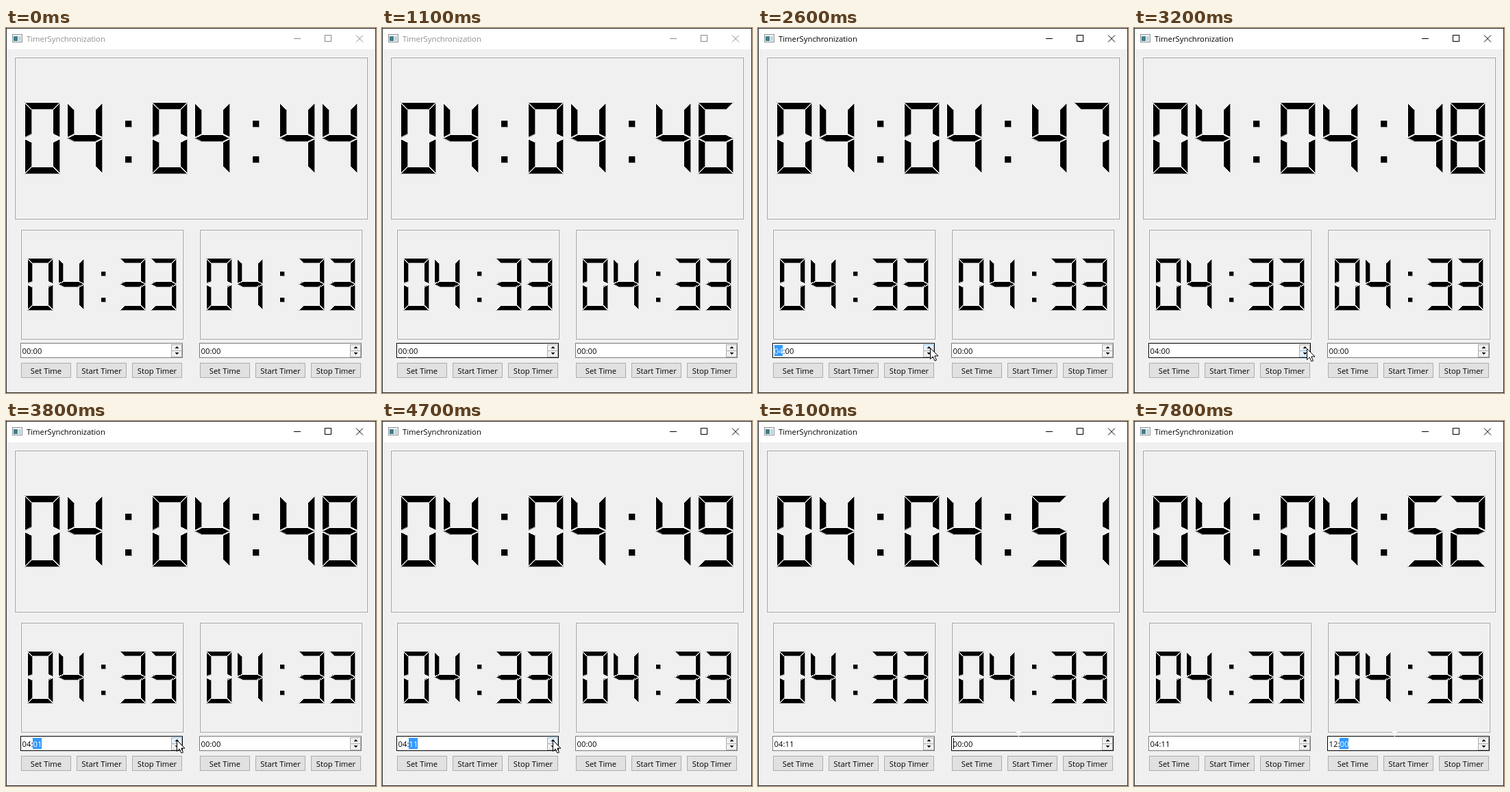
An HTML page that plays this animation: 540 px wide and 532 px high, repeating every 8 s.

```html
<!DOCTYPE html>
<html lang="en">
<head>
<meta charset="utf-8">
<title>TimerSynchronization</title>
<style>
  html, body { margin: 0; width: 100%; height: 100%; overflow: hidden; background: #f0f0f0; }
  svg { display: block; shape-rendering: crispEdges; }
  text { font: 11.3px "Open Sans", "Noto Sans", sans-serif; white-space: pre; }
</style>
</head>
<body>
<svg width="540" height="532" viewBox="0 0 540 532">
  <g id="fixed"></g>
  <g id="live"></g>
</svg>
<script>
const LOOP = 8000, STEP = 100;

// Each table lists [start time, ...state]; a state holds until the next one.
const TICKS = [200, 1100, 2200, 3100, 4100, 5100, 6100, 7100];
const LEFT = [
  [0, '00:00'], [2000, '01:00', 'h'], [2100, '02:00', 'h'], [2300, '03:00', 'h'],
  [2500, '04:00', 'h'], [2900, '04:00'], [3800, '04:01', 'm'], [4100, '04:04', 'm'],
  [4200, '04:06', 'm'], [4300, '04:09', 'm'], [4400, '04:11', 'm'], [5100, '04:11'],
];
const RIGHT = [
  [0, '00:00'], [5100, '00:00', 'caret', 0], [5600, '00:00'], [6100, '00:00', 'caret', 0],
  [6700, '00:00'], [7000, '00:00', 'caret', 6], [7500, '00:00', 'm'],
  [7700, '1:00', 'caret', 6], [7800, '12:00', 'm'],
];
const MOUSE = [
  [0, 20, -19, 'arrow'], [200, 20, -8, 'arrow'], [300, 20, 12, 'arrow'], [400, 21, 65, 'arrow'],
  [500, 22, 160, 'arrow'], [600, 25, 280, 'arrow'], [700, 28, 390, 'arrow'], [800, 31, 452, 'arrow'],
  [900, 34, 485, 'arrow'], [1000, 36, 474, 'beam'], [1800, 130, 471, 'beam'],
  [1900, 249, 467, 'arrow'], [2000, 251, 466, 'arrow'], [2900, 252, 466, 'arrow'],
  [3000, 252, 467, 'arrow'], [3300, 150, 471, 'beam'], [3400, 46, 472, 'beam'],
  [3600, 160, 470, 'beam'], [3700, 249, 465, 'arrow'], [4800, 290, 464, 'beam'],
  [4900, 340, 468, 'beam'], [5200, 350, 467, 'beam'], [5300, 358, 466, 'beam'],
  [5400, 366, 465, 'beam'], [5500, 373, 463, 'beam'], [5600, 378, 462, 'beam'], [5700, 380, 461, 'beam'],
];
const SEGMENTS = ['012456', '25', '02346', '02356', '1235', '01356', '013456', '025', '0123456', '012356'];

const stateAt = (table, t) => table.filter(row => row[0] <= t).pop().slice(1);
const rect = (x, y, w, h, fill, stroke) => stroke
  ? `<rect x="${x + .5}" y="${y + .5}" width="${w - 1}" height="${h - 1}" fill="${fill}" stroke="${stroke}"/>`
  : `<rect x="${x}" y="${y}" width="${w}" height="${h}" fill="${fill}"/>`;
const path = (d, fill, stroke = 'none') => `<path d="${d}" fill="${fill}" stroke="${stroke}"/>`;
const label = (x, y, body, fill = '#000', anchor = 'start') =>
  `<text x="${x}" y="${y}" fill="${fill}" text-anchor="${anchor}">${body}</text>`;

// Corner points of a segment, and for each edge whether it is lit (L) or shaded (D).
function segmentShape(id, n) {
  const w = Math.floor(n / 5), h = Math.floor(w / 2), up = -Math.ceil(w / 2), r = n - 1;
  const odd = w % 2, dot = Math.floor(n / 2) - h + 1;
  return {
    0: [0, 0, 'LDDD', [[0, 0], [r, 0], [r - w, w], [w, w]]],
    1: [0, 1, 'LDDL', [[0, 0], [w, w], [w, n - h - 2], [0, n - 2]]],
    2: [r, 1, 'DLLL', [[0, 0], [0, n - 2], [-w, n - h - 2], [-w, w]]],
    3: [0, n, 'LLLDDD', [[0, 0], [w, up], [r - w, up], [r, 0],
      [r - w - 2 * odd, h + odd], [w + 2 * odd, h + odd]]],
    4: [0, n + 1, 'LDDL', [[0, 0], [w, h], [w, n - w - 2], [0, n - 2]]],
    5: [r, n + 1, 'DLLL', [[0, 0], [0, n - 2], [-w, n - w - 2], [-w, h]]],
    6: [0, 2 * n, 'LLLD', [[0, 0], [w, -w], [r - w, -w], [r, 0]]],
    8: [dot, Math.floor(n / 2) + w, 'DDLL', [[0, 0], [w, 0], [w, -w], [0, -w]]],
    9: [dot, Math.floor(3 * n / 2) + w, 'DDLL', [[0, 0], [w, 0], [w, -w], [0, -w]]],
  }[id];
}

function segment(x, y, id, n) {
  const [dx, dy, edges, corners] = segmentShape(id, n);
  const points = corners.map(([px, py]) => [x + dx + px, y + dy + py]);
  const lines = [...edges].map((edge, i) => {
    const [a, b] = [points[i], points[(i + 1) % points.length]].map(p => p.map(v => v + .5));
    return `<path d="M${a}L${b}" stroke="${edge === 'L' ? '#fff' : '#a0a0a0'}" stroke-linecap="square"/>`;
  });
  return path(`M${points.join('L')}Z`, '#000') + lines.join('');
}

const lcd = (x, y, n, advance, value) => [...value].map((ch, i) =>
  [...(ch === ':' ? '89' : SEGMENTS[ch])].map(id => segment(x + advance * i, y, id, n)).join('')).join('');

const bevel = (x, y, w, h) =>
  path(`M${x + .5} ${y + h - .5}V${y + .5}H${x + w - .5}M${x + 1.5} ${y + h - 1.5}H${x + w - 1.5}V${y + 1.5}`, 'none', '#fff') +
  path(`M${x + .5} ${y + h - .5}H${x + w - .5}V${y + .5}M${x + 1.5} ${y + h - 1.5}V${y + 1.5}H${x + w - 1.5}`, 'none', '#a0a0a0');

const pushButton = (x, name) =>
  rect(x, 488, 73, 22, '#e1e1e1', '#adadad') + label(x + 36.5, 504, name, '#000', 'middle');

function timeEdit(x, [value, mark, offset], dark, hot) {
  const spin = (y, h, on, arrow) =>
    rect(x + 220, y, 16, h, on ? '#e5f1fb' : '#f0f0f0', on ? '#7fb8e6' : '#adadad') + path(arrow, '#000');
  const selected = mark === 'h' || mark === 'm';
  let [hours, minutes] = value.split(':');
  const white = s => `<tspan fill="#fff">${s}</tspan>`;
  if (mark === 'h') hours = white(hours);
  if (mark === 'm') minutes = white(minutes);
  return rect(x, 459, 237, 22, '#fff', dark ? '#000' : '#7a7a7a') +
    (selected ? rect(x + (mark === 'h' ? 3 : 18), 462, mark === 'h' ? 12 : 13, 16, '#3399ff') : '') +
    label(x + 2.5, 475, `${hours}:${minutes}`) +
    (mark === 'caret' ? rect(x + 3 + offset, 462, 1, 16, '#000') : '') +
    spin(461, 10, hot === 'up', `M${x + 225} 467h6l-3 -3z`) +
    spin(470, 10, hot === 'down', `M${x + 225} 473h6l-3 3z`);
}

function titleBar(active) {
  const ink = active ? '#000' : '#8a8a8a';
  return label(30, 20, 'TimerSynchronization', active ? '#000' : '#8f8f8f') +
    path('M420 15.5h10M465.5 10.5h9v9h-9z', 'none', ink) +
    `<path d="M511 10.5l10 10m0-10l-10 10" stroke="${ink}" shape-rendering="auto"/>`;
}

function pointer(x, y, kind) {
  if (kind === 'beam')
    return path(`M${x - 3} ${y - 7.5}h7M${x + .5} ${y - 8}v16M${x - 3} ${y + 7.5}h7`, 'none', '#fff');
  return `<path transform="translate(${x + .5} ${y + .5})" d="M0 0V16L3.7 12.4 6.5 18.5 9 17.5 6.3 11.5H11.5Z"
    fill="#fff" stroke="#000" shape-rendering="auto"/>`;
}

function fixedParts() {
  const frames = bevel(12, 42, 516, 237) + [21, 282].map(x =>
    bevel(x, 293, 238, 161) + lcd(x + 10, 335, 38, 45, '04:33') +
    ['Set Time', 'Start Timer', 'Stop Timer'].map((name, i) => pushButton(x + 1 + 81 * i, name)).join('')).join('');
  return rect(0, 0, 540, 532, '#f0f0f0', '#2b2b2b') + rect(1, 1, 538, 30, '#fff') +
    rect(9, 9, 15, 12, '#f4f8fa', '#8b8f94') + rect(11, 12, 6, 7, '#3f7f86') +
    rect(18, 12, 4, 7, '#c3d3da') + frames;
}

function liveParts(t) {
  const [x, y, kind] = stateAt(MOUSE, t);
  const overSpin = kind === 'arrow' && x > 240 && y > 459;
  const hot = overSpin && (y < 467 ? 'up' : 'down');
  const seconds = 44 + TICKS.filter(at => at <= t).length;
  return titleBar(t >= 1200) + lcd(27, 108, 52, 62, `04:04:${seconds}`) +
    timeEdit(21, stateAt(LEFT, t), t >= 1000 && t < 5100, hot) +
    timeEdit(282, stateAt(RIGHT, t), t >= 4900) + pointer(x, y, kind);
}

const live = document.getElementById('live');
document.getElementById('fixed').innerHTML = fixedParts();
let shown = -1;
function draw() {
  const t = Math.floor(performance.now() % LOOP / STEP) * STEP;
  if (t !== shown) live.innerHTML = liveParts(shown = t);
  requestAnimationFrame(draw);
}
draw();
</script>
</body>
</html>
```
